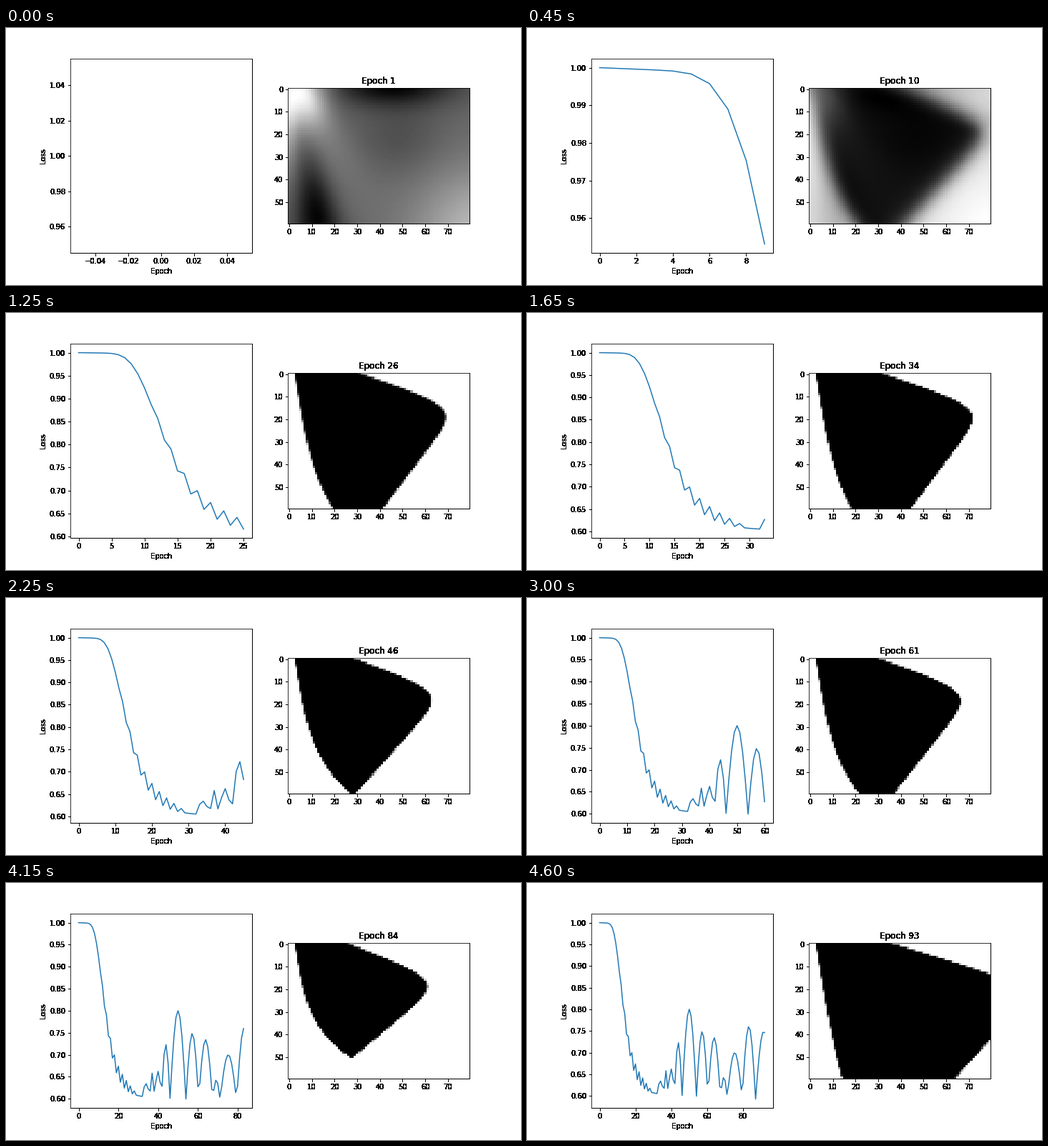
These frames come from a looping animation (720x360 px, 4650 ms). A matplotlib script:

```python
import numpy as np
import matplotlib.pyplot as plt
from matplotlib.animation import FuncAnimation

plt.rcParams.update({
    "font.family": "DejaVu Sans", "font.size": 10,
    "figure.dpi": 72, "figure.subplot.bottom": 0.125,
})

EPOCHS, COLS, ROWS = 93, 80, 60

# Once trained, the fit swings to and fro: turning epochs and heights
TURNS = [32, 35.8, 38.2, 41.7, 46, 54, 60.4, 67.4, 71.2, 79.5, 87, 96]
HEIGHTS = [.03, .055, .06, .122, .2, .15, .137, .047, .105, .167, .157]

row_y = np.arange(ROWS) + 0.5
x, y = np.meshgrid(np.arange(COLS) + 0.5, row_y)


def smoothstep(t):
    t = np.clip(t, 0, 1)
    return t * t * (3 - 2 * t)


def bump(cx, cy, wx, wy):
    return np.exp(-((x - cx) / wx) ** 2 - ((y - cy) / wy) ** 2)


def swing(i):
    """Signed half sine waves between the turning epochs."""
    phase = np.interp(i, TURNS, range(len(TURNS)))
    n = int(phase)
    return (-1) ** n * HEIGHTS[n] * np.sin(np.pi * (phase - n))


def loss(i):
    value = 1 - 0.39 * np.exp(-np.exp(0.229 - 0.27 * (i - 11))) - 0.0002 * i
    if 10 <= i <= 30 and i % 2 == 0:
        value += 0.027 * np.sin(np.pi * (i - 10) / 20)
    return value + abs(swing(i))


LOSS = np.array([loss(i) for i in range(EPOCHS)])


def untrained():
    """Soft grey output of the network before it has learned anything."""
    v = 0.42 + 0.6 * bump(5, 3, 12, 14)
    v += 0.25 * bump(0, 18, 4, 22) + 0.4 * bump(85, 65, 30, 30)
    v += 0.15 * bump(6 + 0.5 * y, 0, 5 + 0.25 * y, 40)
    v -= 0.48 * bump(46, -2, 27, 10) + 0.1 * bump(50, 22, 18, 16)
    wedge = np.exp(-((x - 6 - 0.12 * y) / (3 + 0.12 * y)) ** 2)
    return v - 0.45 * wedge * smoothstep((y - 16) / 42)


START = untrained()


def outline(i):
    """Left and right edge of the dark region in every row."""
    s = 150 * swing(i)
    first = np.array([0.5, 0.25, 6.7, 38, 2.6, 41.5, 0.93])
    later = np.array([3, 0.17, 7 * np.exp(-0.06 * s),
                      30 + 0.2 * s, 2.95 + 0.015 * s,
                      41.5 + 0.97 * s, 0.75 + 0.0005 * (s - 5) ** 2])
    mixed = first + smoothstep((i - 17) / 8) * (later - first)
    left0, lean, flare, top, top_slope, bottom, bottom_slope = mixed

    left = left0 + lean * row_y + flare * (row_y / ROWS) ** 4
    upper = top + top_slope * row_y
    lower = bottom + bottom_slope * (ROWS - row_y)
    # soft minimum rounds the tip
    right = -12 * np.logaddexp(-upper / 12, -lower / 12)
    return left, right


def output(i):
    left, right = outline(i)
    slope = np.hypot(1, np.gradient(right))
    inside = np.minimum(x - left[:, None], (right[:, None] - x) / slope[:, None])
    sharp = np.interp(i, [0, 8, 17, 30], [0.05, 0.2, 2.2, 12])
    inside += min(1.2, 2 / sharp)
    trained = 1 / (1 + np.exp(np.clip(sharp * inside, -60, 60)))
    w = smoothstep(i / 14)
    return (1 - w) * START + w * trained


def crisp(img, dpi):
    """Make lettering and ticks hard-edged and heavy."""
    img[..., 3] = img[..., 3] > 0.05
    return np.round(img * 255).astype(np.uint8), 0, 0


fig, (ax_loss, ax_img) = plt.subplots(1, 2, figsize=(10, 5), dpi=72)
curve, = ax_loss.plot([], [], color="#1f77b4", lw=1.5)
ax_loss.set_xlabel("Epoch")
ax_loss.set_ylabel("Loss")
picture = ax_img.imshow(START, cmap="gray", interpolation="nearest")
title = ax_img.set_title("Epoch 1", fontsize=12)

for ax in (ax_loss, ax_img):
    for part in (ax.xaxis, ax.yaxis):
        part.set_agg_filter(crisp)
    for side in ("bottom", "right"):
        ax.spines[side].set_linewidth(1)
title.set_agg_filter(crisp)


def update(i):
    curve.set_data(np.arange(i + 1), LOSS[:i + 1])
    ax_loss.relim()
    ax_loss.autoscale_view()
    picture.set_data(output(i))
    picture.autoscale()
    title.set_text(f"Epoch {i + 1}")
    return curve, picture, title


anim = FuncAnimation(fig, update, frames=EPOCHS, interval=50,
                     init_func=lambda: update(0), repeat=True)
plt.show()
```
